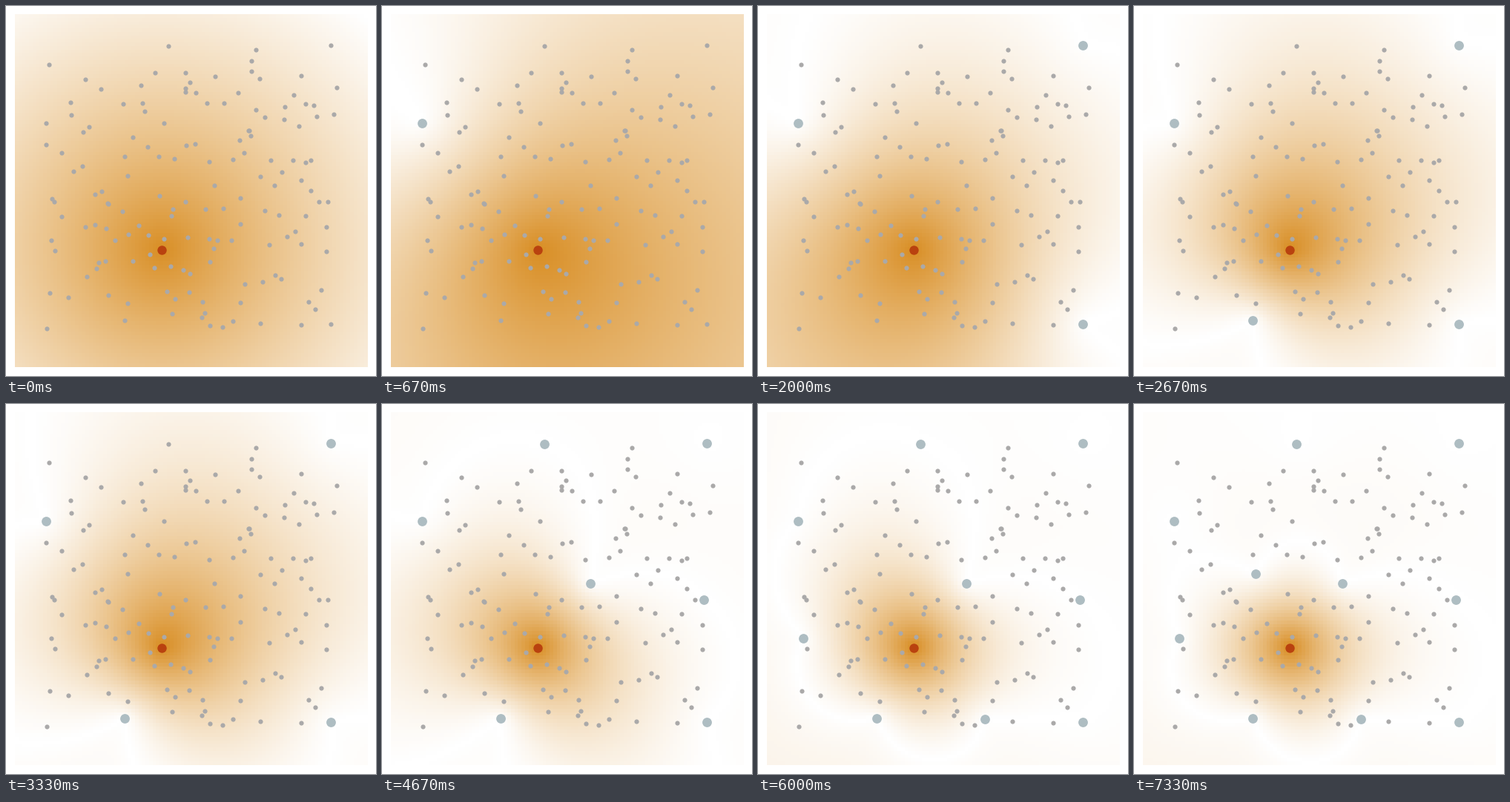
Write a matplotlib script that moves like this. It is 499x499 px and loops after 8 s.

```python
import numpy as np
import matplotlib.pyplot as plt
from matplotlib.animation import FuncAnimation
from matplotlib.colors import LinearSegmentedColormap

SIZE, DPI = 499, 100
LO, HI, CELLS = 12, 487.5, 100
STEPS = 12
LENGTH = HI - LO

# Target of the covariance, then the points conditioned on, in order.
TARGET = np.array([[209.8, 329]])
PICKS = np.array([
    (54, 158.3), (438.2, 429), (438, 53), (159.8, 424), (281.5, 242),
    (219.3, 53.8), (434, 263.8), (61.3, 316), (306, 425), (164, 229.3),
    (349.3, 149.6)])
N_OTHERS = 139


def distance(a, b):
    return np.linalg.norm(a[:, None] - b[None], axis=-1)


def kernel(a, b):
    """Exponential (Matern 1/2) covariance."""
    return np.exp(-distance(a, b) / LENGTH)


def scatter_points(n, seed=3):
    """Uniform points that keep clear of the target and the picks."""
    rng = np.random.default_rng(seed)
    pts = rng.uniform((54, 54), (446, 445), (2 * n, 2))
    keys = np.vstack([TARGET, PICKS])
    return pts[distance(pts, keys).min(axis=1) > 11][:n]


ticks = LO + (np.arange(CELLS) + 0.5) * (HI - LO) / CELLS
grid = np.stack(np.meshgrid(ticks, ticks), -1).reshape(-1, 2)


def field(n):
    """Size of the covariance with the target, given the first n picks."""
    cov = kernel(grid, TARGET)[:, 0]
    if n:
        p = PICKS[:n]
        weights = np.linalg.solve(kernel(p, p), kernel(p, TARGET))
        cov = cov - (kernel(grid, p) @ weights)[:, 0]
    cov = np.abs(cov)
    cov = (cov - cov.min()) / (cov.max() - cov.min())
    return cov.reshape(CELLS, CELLS)


fig = plt.figure(figsize=(SIZE / DPI, SIZE / DPI), dpi=DPI, facecolor="white")
ax = fig.add_axes([0, 0, 1, 1])
ax.set_xlim(0, SIZE)
ax.set_ylim(SIZE, 0)
ax.axis("off")


def dots(pts, width, color, z):
    return ax.scatter(*pts.T, s=(width * 72 / DPI) ** 2, c=color,
                      linewidths=0, zorder=z)


cmap = LinearSegmentedColormap.from_list("heat", ["white", "#d98f26"])
heat = ax.imshow(field(0), cmap=cmap, vmin=0, vmax=1, aspect="auto",
                 extent=(LO, HI, HI, LO), interpolation="nearest")
dots(np.vstack([scatter_points(N_OTHERS), PICKS]), 6.2, "#aaa9a9", 2)
chosen = dots(PICKS, 12.8, "#aebdc2", 3)
dots(TARGET, 12.4, "#b9420f", 4)


def draw(step):
    heat.set_data(field(step))
    chosen.set_offsets(PICKS[:step])
    return heat, chosen


anim = FuncAnimation(fig, draw, frames=STEPS, interval=8000 / STEPS,
                     repeat=True, repeat_delay=0, blit=False)
plt.show()
```
